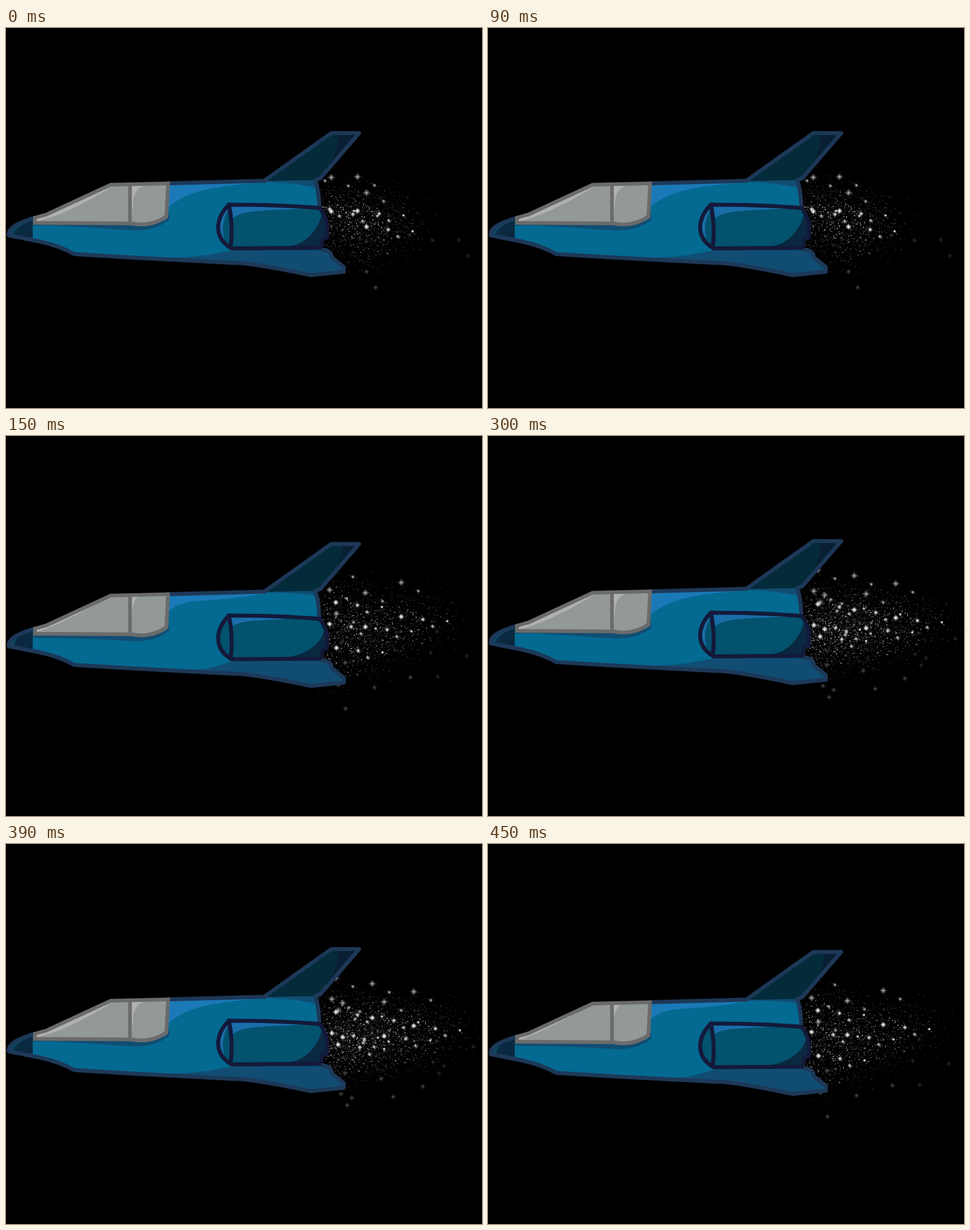
Write an HTML page with a canvas that moves like this. It is 837x669 px and loops after 600 ms.

```html
<!DOCTYPE html>
<html lang="en">
<head>
<meta charset="utf-8">
<title>Shuttle</title>
<style>
  html, body { margin: 0; width: 100%; height: 100%; overflow: hidden; background: #000; }
  canvas { display: block; }
</style>
</head>
<body>
<canvas id="stage" width="837" height="669"></canvas>
<script>
const ctx = document.getElementById('stage').getContext('2d');
const STEP = 150;

const C = {
  line: '#1d3858', body: '#046a91', light: '#1b79b7', shade: '#114d73',
  fin: '#032b3a', dark: '#0a2940', finDark: '#091f33',
  frame: '#6b6b6b', glass: '#939898', shine: '#b0b1b1',
  pod: '#03526e', podLine: '#13193a', podLight: '#1a6da8'
};

const P = d => new Path2D(d);

const hull = P('M5 365Q4 357 13 350Q24 342 51 334L184 276L285 273L454 269L544 268Q550 287 551 316L555 389Q572 391 572 403L594 421L594 429L536 435Q455 418 415 414L390 413L220 404L120 398Q96 384 60 376Z');
const hullEdge = P('M51 334Q24 342 13 350Q4 357 5 365L60 376Q96 384 120 398L220 404L390 413L415 414Q455 418 536 435L594 429L594 421L573 404Q572 391 555 390M285 273.5L454 269M544 268Q550 287 551 316');
const fin = P('M454 269L572 185L621 185L553 264L544 268Z');
const finEdge = P('M454 269L572 185L621 185L553 264L544 268');
const nose = P('M0 330H47V376H0Z');
const canopy = P('M51 334L72 328L184 276L285 273.5L282 332Q254 351 220 344L51 343Z');
const pod = P('M392 311Q480 311 552 317Q564 334 565 350L564 369L556 372L555 381L552 387L397 388Q373 375 373 350Q374 329 392 311Z');
const podSeam = P('M392 311Q400 350 395 387');

// The light falls slightly differently in the two poses.
const poses = [
  {
    dy: 0,
    top: P('M286 270V315C320 285 380 276 455 272V268Z'),
    tail: P('M445 272Q505 270 560 285V265H445Z'),
    belly: P('M265 404C345 405 365 397 400 391L620 380V445H265Z'),
    sill: P('M47 340V348C110 346 180 355 222 356Q262 358 287 338V328H280V340Z'),
    noseDark: P('M12 366Q17 348 47 339V374Z'),
    finDark: P('M583 185C586 220 568 247 543 268H560L625 185Z'),
    shine: P('M188 278H178L51 333V341C95 332 143 306 188 278Z'),
    pane: P('M221 276H247Q227 282 224 301L221 335Z'),
    podLight: P('M396 312V340C405 320 450 322 525 318V312Z'),
    podDark: P('M556 325C548 360 523 385 488 385V391H570V325Z'),
    cap: P('M392 318C380 338 378 360 387 382L370 380V318Z')
  },
  {
    dy: 5,
    top: P('M286 270V304C318 276 350 292 455 272V268Z'),
    tail: P('M455 271Q510 269 560 278V265H455Z'),
    belly: P('M335 407Q365 404 398 391L620 380V445H335Z'),
    sill: P('M47 340V350C110 351 180 353 222 356Q262 358 287 338V328H280V340Z'),
    noseDark: P('M14 368Q15 349 32 340L47 335V375Z'),
    finDark: P('M592 185C590 222 574 250 544 268H560L625 185Z'),
    shine: P('M184 278H178L51 333V341C95 328 140 300 184 278Z'),
    pane: P('M221 276H235Q223 284 221 306Z'),
    podLight: P('M396 312V332C408 318 450 320 515 316V312Z'),
    podDark: P('M560 335C553 367 520 383 482 386V391H570V335Z'),
    cap: P('M387 318C377 328 375 340 376 350L370 350V318Z')
  }
];

// Positions of the drifting dust cloud copies, per step.
const drift = [
  [[618, 262], [634, 290], [572, 263], [531, 254]],
  [[695, 258], [632, 276], [569, 271], [580, 233], [581, 313]],
  [[717, 260], [665, 278], [644, 246], [592, 280], [573, 273], [580, 236], [584, 293]]
];
const order = [0, 1, 2, 1];

let seed = 71;
function rnd() {
  seed = (seed * 16807) % 2147483647;
  return seed / 2147483647;
}
const bell = () => (rnd() + rnd() + rnd() + rnd() - 2) * 1.73;

const dust = Array.from({ length: 820 }, (_, i) => {
  const wide = i % 3 === 0;
  const x = bell() * (wide ? 64 : 45), y = bell() * (wide ? 57 : 36);
  const fade = Math.exp(-(x * x / 9000 + y * y / 4200));
  return {
    x: 14 + x, y: 71 + y,
    r: 0.35 + 0.65 * Math.pow(rnd(), 4),
    a: fade * (0.25 + 0.75 * rnd())
  };
});

// x, y, radius, brightness, has rays
const sparks = [
  [0, 0, 5, 0.32, 1], [0, 60, 4, 0.75, 1], [30, 15, 3, 0.5, 0],
  [81, 68, 2.4, 0.8, 0], [38, 65, 3.4, 0.6, 1], [55, 77, 3, 0.5, 1],
  [16, 167, 4, 0.13, 1], [178, 111, 4, 0.07, 1]
];

function dot(x, y, r) {
  ctx.beginPath();
  ctx.arc(x, y, r, 0, 7);
  ctx.fill();
}

function spark([x, y, r, a, rays]) {
  ctx.globalAlpha = a * 0.6;
  dot(x, y, r);
  ctx.globalAlpha = a;
  dot(x, y, r * 0.5);
  if (!rays) return;
  const l = r * 1.8, w = r * 0.22;
  ctx.beginPath();
  for (let i = 0; i < 8; i++) {
    const q = i * Math.PI / 4, d = i % 2 ? w : l;
    ctx.lineTo(x + d * Math.cos(q), y + d * Math.sin(q));
  }
  ctx.fill();
}

function drawCloud([x, y]) {
  ctx.save();
  ctx.translate(x, y);
  ctx.fillStyle = '#fff';
  for (const p of dust) {
    ctx.globalAlpha = p.a;
    dot(p.x, p.y, p.r);
  }
  sparks.forEach(spark);
  ctx.restore();
}

function fill(path, color) {
  ctx.fillStyle = color;
  ctx.fill(path);
}

function stroke(path, color, width = 7) {
  ctx.strokeStyle = color;
  ctx.lineWidth = width;
  ctx.stroke(path);
}

function shaded(shape, base, ...layers) {
  ctx.save();
  ctx.clip(shape);
  fill(shape, base);
  for (const [path, color] of layers) fill(path, color);
  ctx.restore();
}

function drawShip(p) {
  ctx.save();
  ctx.translate(0, p.dy);
  ctx.lineJoin = ctx.lineCap = 'round';
  shaded(fin, C.fin, [p.finDark, C.finDark]);
  shaded(hull, C.body, [p.top, C.light], [p.tail, C.shade], [p.belly, C.shade],
    [p.sill, C.shade], [nose, '#0b4560'], [p.noseDark, C.dark]);
  stroke(finEdge, C.line);
  stroke(hullEdge, C.line);
  shaded(canopy, C.glass, [p.shine, C.shine], [p.pane, C.shine]);
  ctx.lineJoin = 'miter';
  stroke(canopy, C.frame, 6.5);
  stroke(P('M218 277V344'), C.frame, 6.5);
  ctx.lineJoin = 'round';
  shaded(pod, C.pod, [p.podLight, C.podLight], [p.podDark, C.dark], [p.cap, C.podLight]);
  stroke(pod, C.podLine);
  stroke(podSeam, C.podLine);
  ctx.restore();
}

function draw(now) {
  const step = Math.floor(now / STEP) % order.length;
  ctx.fillStyle = '#000';
  ctx.fillRect(0, 0, 837, 669);
  drift[order[step]].forEach(drawCloud);
  drawShip(poses[step % 2]);
}

let start;
function tick(now) {
  start ??= now;
  draw(now - start);
  requestAnimationFrame(tick);
}
draw(0);
requestAnimationFrame(tick);
</script>
</body>
</html>
```
